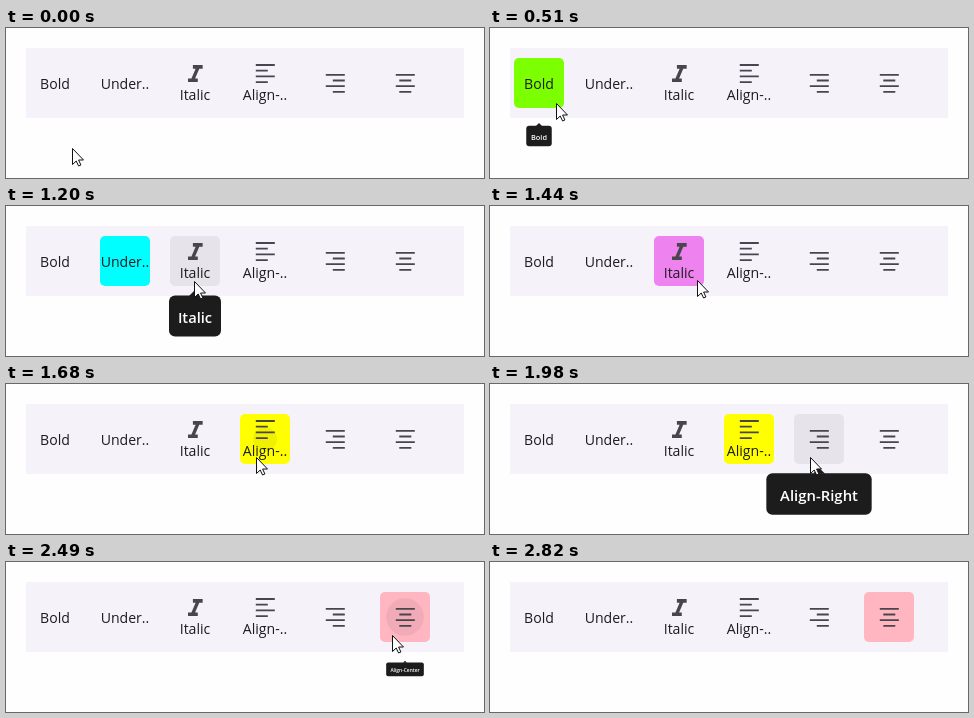
Animation, 478 px wide and 150 px high, one loop 3.33 s. Source, as an HTML page:

```html
<!DOCTYPE html>
<html lang="en">
<head>
<meta charset="utf-8">
<title>Toolbar selection</title>
<style>
  html, body { margin: 0; width: 100%; height: 100%; overflow: hidden; background: #fefefe; }
  svg { display: block; width: 478px; height: 150px; }
  text { font: 14.1px "Open Sans", "Noto Sans", sans-serif; fill: #1c1b1f; text-anchor: middle; }
  .tip text { font-size: 14.7px; font-weight: 600; fill: #fff; }
  .tip { fill: #1c1c1c; }
</style>
</head>
<body>
<svg id="stage" viewBox="0 0 478 150">
  <rect x="20" y="20" width="438" height="70" fill="#f5f2fa"/>
</svg>
<script>
const LOOP = 3330, STEP = 30, TIP_TIME = 90, RIPPLE_TIME = 150;
const stage = document.getElementById('stage');

// Times in ms: tip appears, tip starts to close, item is clicked.
const items = [
  { label: 'Bold', tip: 'Bold', tipWidth: 51, color: '#7cff00', open: 180, close: 465, click: 360 },
  { label: 'Under..', tip: 'Underline', tipWidth: 92, color: '#00ffff', open: 610, close: 760, click: 780 },
  { label: 'Italic', tip: 'Italic', tipWidth: 52, color: '#ee82ee', icon: 'italic', open: 1040, close: 1260, click: 1290 },
  { label: 'Align-..', tip: 'Align-Left', tipWidth: 92, color: '#ffff00', icon: 'left', open: 1460, close: 1680, click: 1680, snap: true },
  { tip: 'Align-Right', tipWidth: 104, color: '#40e0d0', icon: 'right', open: 1900, close: 2050, click: 2070 },
  { tip: 'Align-Center', tipWidth: 113, color: '#ffb6c1', icon: 'center', open: 2190, close: 2430, click: 2460 }
];

const cursorPath = [
  [0, 66, 120], [40, 66, 120], [180, 66, 75], [520, 66, 75], [570, 92, 75], [585, 92, 75],
  [660, 109, 75], [950, 109, 75], [1080, 188, 75], [1400, 188, 75], [1510, 250, 73],
  [1780, 250, 73], [1910, 320, 73], [2150, 320, 73], [2190, 371, 73], [2260, 390, 73],
  [2340, 390, 73], [2420, 386, 73], [2730, 386, 73], [2790, 412, 94], [LOOP, 412, 94]
];

function add(parent, tag, attrs = {}, content = '') {
  const node = document.createElementNS('http://www.w3.org/2000/svg', tag);
  set(node, attrs);
  node.textContent = content;
  return parent.appendChild(node);
}

function set(node, attrs) {
  for (const name in attrs) node.setAttribute(name, attrs[name]);
}

function drawIcon(item) {
  if (item.icon === 'italic') {
    add(stage, 'path', {
      d: 'M10 4v3h2.21l-3.42 8H6v3h8v-3h-2.21l3.42-8H18V4z',
      transform: 'translate(174.7 32.1) scale(1.22)', fill: '#49454f'
    });
    return;
  }
  const align = { left: 0, center: 0.5, right: 1 }[item.icon];
  const top = item.label ? 37 : 46.8;
  const lines = [19, 12, 19, 12].map((width, i) =>
    `M${item.x - 9.2 + (19 - width) * align} ${top + i * 5.7}h${width}`);
  add(stage, 'path', { d: lines.join(''), stroke: '#49454f', 'stroke-width': 1.8 });
}

items.forEach((item, i) => {
  item.x = 49 + i * 70;
  const box = { x: item.x - 25, y: 30, width: 50, height: 50, rx: 5 };
  const clip = add(stage, 'clipPath', { id: 'clip' + i });
  add(clip, 'rect', box);
  item.box = add(stage, 'rect', box);
  item.ripple = add(stage, 'circle', { cx: item.x, cy: 55, 'clip-path': `url(#clip${i})` });
  if (item.icon) drawIcon(item);
  if (item.label) add(stage, 'text', { x: item.x, y: item.icon ? 72 : 61 }, item.label);
});

for (const item of items) {
  item.bubble = add(stage, 'g', { class: 'tip' });
  add(item.bubble, 'rect', { x: -item.tipWidth / 2, y: -16.5, width: item.tipWidth, height: 41, rx: 6 });
  add(item.bubble, 'path', { d: 'M-6 -16L0 -22L6 -16Z' });
  add(item.bubble, 'text', { y: 11 }, item.tip);
}

const cursor = add(stage, 'path', {
  d: 'M0.5 0.5V16.5L4.2 13L6.6 18L8.9 17L6.6 12H11.5Z',
  fill: '#fff', stroke: '#111', 'stroke-width': 1
});

const clamp = v => Math.max(0, Math.min(1, v));
const smooth = p => p * p * (3 - 2 * p);

function backOut(p) {
  const q = p - 1;
  return 1 + 2.3 * q ** 3 + 1.3 * q ** 2;
}

function cursorAt(t) {
  const i = cursorPath.findIndex(point => point[0] > t);
  const [t0, x0, y0] = cursorPath[i - 1], [t1, x1, y1] = cursorPath[i];
  const p = smooth((t - t0) / (t1 - t0));
  return [x0 + (x1 - x0) * p, y0 + (y1 - y0) * p];
}

function tipScale(item, t) {
  if (t <= item.open) return 0;
  if (t < item.close) return backOut(clamp((t - item.open) / TIP_TIME));
  return item.snap ? 0 : 1 - clamp((t - item.close) / TIP_TIME);
}

function render(t) {
  const [cx, cy] = cursorAt(t);
  const selected = items.filter(item => t >= item.click).pop();
  for (const item of items) {
    const hovered = Math.abs(cx - item.x) <= 25 && cy < 80;
    const fill = item === selected ? item.color : hovered ? '#e7e3ea' : 'none';
    set(item.box, { fill });

    const age = t - item.click;
    const active = age >= 0 && age < RIPPLE_TIME;
    set(item.ripple, {
      r: active ? 12 + 25 * clamp(age / 110) : 0,
      'fill-opacity': 0.06
    });

    const scale = tipScale(item, t);
    set(item.bubble, {
      visibility: scale > 0.01 ? 'visible' : 'hidden',
      transform: `translate(${item.x} 106) scale(${scale})`
    });
  }
  set(cursor, {
    transform: `translate(${Math.round(cx)} ${Math.round(cy)})`,
    visibility: t < 2820 ? 'visible' : 'hidden'
  });
}

const start = performance.now();
function tick() {
  const t = (performance.now() - start) % LOOP;
  render(Math.floor(t / STEP) * STEP);
  requestAnimationFrame(tick);
}
tick();
</script>
</body>
</html>
```
